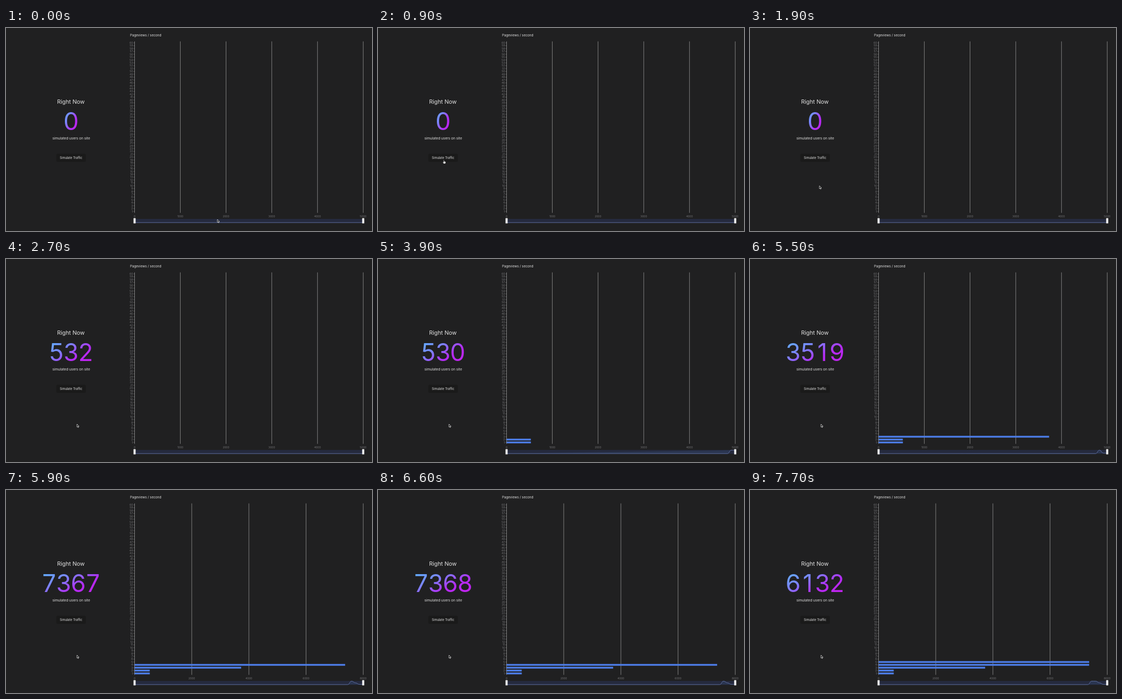
Animation, 696 px wide and 386 px high, one loop 8 s. Source, as an HTML page:

```html
<!DOCTYPE html>
<html lang="en">
<head>
<meta charset="utf-8">
<title>Pageviews</title>
<style>
  html, body { margin: 0; width: 100%; height: 100%; overflow: hidden; background: #202021; }
  svg { display: block; font-family: Inter, "Liberation Sans", sans-serif; }
  text { fill: #e2e2e2; text-anchor: middle; }
  .axis text { fill: #77777a; font-size: 5px; }
  .axis .row { text-anchor: end; }
  .axis path { stroke: #8c8c8c; stroke-width: .9; }
  #count { font-size: 46px; fill: url(#glow); }
</style>
</head>
<body>
<svg width="696" height="386" viewBox="0 0 696 386">
  <defs>
    <linearGradient id="glow" x1="0" y1="0" x2="1" y2="1">
      <stop offset="0" stop-color="#58bdfb"/>
      <stop offset=".35" stop-color="#7b85ff"/>
      <stop offset=".63" stop-color="#b42bf5"/>
      <stop offset="1" stop-color="#c81fe8"/>
    </linearGradient>
  </defs>
  <text x="123.5" y="143.6" font-size="10.8">Right Now</text>
  <text id="count" y="194.3"></text>
  <text x="124" y="211.8" font-size="6.6">simulated users on site</text>
  <rect x="95.5" y="239" width="56.5" height="15.5" rx="3" fill="#1a1a1a"/>
  <text x="123.7" y="248.6" font-size="5.8">Simulate Traffic</text>
  <text x="236" y="16" font-size="6.25" style="text-anchor:start">Pageviews / second</text>
  <g id="rows" class="axis"></g>
  <g id="columns" class="axis"></g>
  <g id="bars" fill="#4c7ce6"></g>
  <rect x="244.5" y="363" width="435" height="7.5" fill="#252a3e"/>
  <path id="shadow" fill="#2b3651" stroke="#6474a8" stroke-width=".9"/>
  <g fill="#efefef">
    <rect x="242.5" y="361.5" width="4" height="10" rx=".6"/>
    <rect x="677.3" y="361.5" width="4" height="10" rx=".6"/>
  </g>
  <g id="pointer" stroke="#fff" stroke-width=".7" stroke-linejoin="round">
    <path id="arrow" fill="#000" d="M0 0V5.6L1.3 4.4 2.2 6.4 3.1 6 2.2 4.1H4Z"/>
    <path id="hand" fill="#fff" stroke="#111" stroke-width=".5"
      d="M-.8 .4Q-.2 -.4 .3 .4V2.6L2.9 3.2Q3.5 3.5 3.3 4.5L2.6 7H-.6L-2.3 4.5Q-2.3 3.5 -1.4 3.9L-.8 4.4Z"/>
  </g>
</svg>
<script>
const LOOP = 8000, STEP = 100;
const LEFT = 244.5, RIGHT = 679.3, TOP = 25.5, BOTTOM = 351.5;
const ROWS = 60, PITCH = (BOTTOM - TOP) / ROWS;

// Each track lists [start time, value...]; values hold until the next entry.
const counts = [[0, 0], [2300, 3], [2700, 532], [3700, 530], [4400, 3729],
  [5500, 3519], [5800, 7367], [6400, 7368], [7700, 6132]];
const samples = [[2900, 532], [3900, 530], [4900, 3729], [5800, 7367], [7100, 7368]];
const pointerPath = [[0, 402, 364], [100, 330, 351], [200, 200, 331], [300, 139, 323],
  [600, 138, 317], [700, 134, 290], [800, 128, 262], [900, 125.5, 251],
  [1800, 127, 268], [1900, 132, 300], [2000, 135, 314]];

const $ = id => document.getElementById(id);
const at = (track, t) => track.filter(entry => entry[0] <= t).pop();
const rowY = i => BOTTOM - (i + .5) * PITCH;

$("rows").innerHTML = Array.from({ length: ROWS }, (_, i) =>
  `<text class="row" x="241.3" y="${rowY(i) + 1.8}">${i + 1}</text>
   <path d="M242.3 ${rowY(i)}H${LEFT}" style="stroke-width:.6"/>`).join("");

function drawCount(value) {
  const digits = String(value);
  const xs = [...digits].map((_, i) => 123.7 + (i - (digits.length - 1) / 2) * 27.8);
  $("count").setAttribute("x", xs.join(" "));
  $("count").textContent = digits;
}

function drawChart(values) {
  const wide = Math.max(0, ...values) > 5000;
  const max = wide ? 8000 : 5000, tick = wide ? 2000 : 1000;
  const scale = (RIGHT - LEFT) / max;
  let columns = "";
  for (let v = 0; v <= max; v += tick) {
    const x = LEFT + v * scale;
    columns += `<path d="M${x} ${TOP}V${BOTTOM}"/><text x="${x}" y="359.6">${v}</text>`;
  }
  $("columns").innerHTML = columns;
  $("bars").innerHTML = values.map((v, i) =>
    `<rect x="${LEFT}" y="${rowY(i) - 1.7}" width="${v * scale}" height="3.4"/>`).join("");
}

// Overview curve, newest rows running leftwards from the right handle.
function drawShadow(values) {
  const peak = Math.max(1, ...values), gap = (RIGHT - LEFT) / (ROWS - 1);
  const y = i => 370 - 6.6 * (values[i] || 0) / peak;
  let d = `M${RIGHT} ${y(0)}`;
  for (let i = 1; i <= values.length; i++) {
    const x = RIGHT - i * gap, mid = x + gap / 2;
    d += `C${mid} ${y(i - 1)} ${mid} ${y(i)} ${x} ${y(i)}`;
  }
  $("shadow").setAttribute("d", d + `L${LEFT} 370`);
}

function drawPointer(t) {
  const [, x, y] = at(pointerPath, t);
  const hovering = t >= 900 && t < 1800;
  $("pointer").setAttribute("transform", `translate(${x} ${y})`);
  $("arrow").style.display = hovering ? "none" : "";
  $("hand").style.display = hovering ? "" : "none";
}

let shown = -1;
function frame(now) {
  const t = Math.floor(now % LOOP / STEP) * STEP;
  if (t !== shown) {
    shown = t;
    const values = samples.filter(s => s[0] <= t).map(s => s[1]);
    drawCount(at(counts, t)[1]);
    drawChart(values);
    drawShadow(values);
    drawPointer(t);
  }
  requestAnimationFrame(() => frame(performance.now() - start));
}
const start = performance.now();
frame(0);
</script>
</body>
</html>
```
